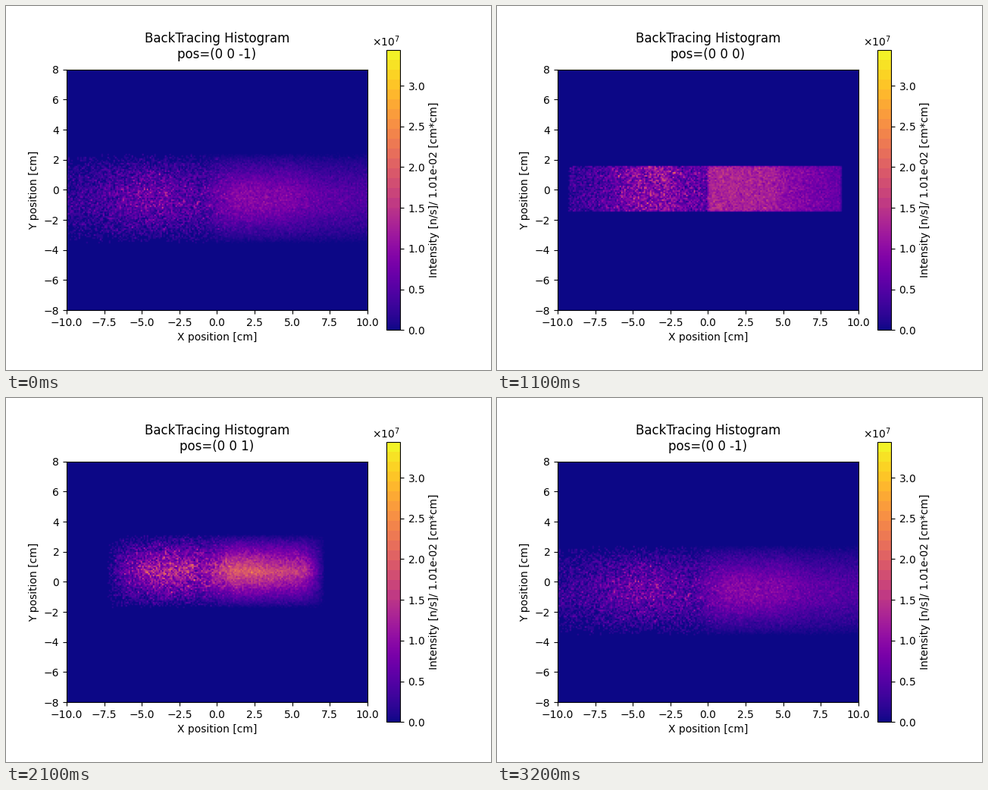
A matplotlib script for the animation above (3.4 s loop, 640 px wide and 480 px high).

```python
import numpy as np
import matplotlib.pyplot as plt
from matplotlib.animation import FuncAnimation
from matplotlib.colors import ListedColormap
from matplotlib.ticker import ScalarFormatter

FRAMES, INTERVAL = 34, 100
NX, NY = 199, 159
X_LIM, Y_LIM = (-10, 10), (-8, 8)
V_MAX = 3.442e7
Y_LOW, Y_HIGH = -1.45, 1.55
SPREAD = 1.2           # half width of the ray slopes
EXIT_Z, EXIT_X = 2, 5.4  # all rays pass |x| < EXIT_X at z = EXIT_Z

rng = np.random.default_rng(7)


def make_beam(xs, intensity, weight):
    """Sample rays at z=0 for a piecewise linear intensity profile along x."""
    grid = np.linspace(xs[0], xs[-1], 2000)
    density = np.interp(grid, xs, intensity)
    cdf = np.cumsum(density)
    cdf /= cdf[-1]
    bins = (xs[-1] - xs[0]) * NX / 20 * (Y_HIGH - Y_LOW) * NY / 16
    n = int(density.mean() * bins / weight)
    x = np.interp(rng.random(n), cdf, grid)
    y = rng.uniform(Y_LOW, Y_HIGH, n)
    # slopes converge towards the axis; the exit window cuts the outer ones
    low = np.maximum(-0.2 * x - SPREAD, (-EXIT_X - x) / EXIT_Z)
    high = np.minimum(-0.2 * x + SPREAD, (EXIT_X - x) / EXIT_Z)
    dx = rng.uniform(low, high)
    dy = 0.645 - 0.187 * y + rng.uniform(-SPREAD, SPREAD, n)
    return x, y, dx, dy, np.full(n, weight)


left = make_beam([-9.25, -7.5, -5.5, -3.8, -2.5, -1.5, 0],
                 [0.25e7, 0.36e7, 0.75e7, 1.05e7, 0.95e7, 0.65e7, 0.55e7],
                 0.17e7)
right = make_beam([0, 4, 5.5, 8.85],
                  [1.32e7, 1.26e7, 0.95e7, 0.65e7],
                  0.025e7)
x0, y0, dx, dy, weights = (np.concatenate(p) for p in zip(left, right))


def histogram(z):
    col = np.floor((x0 + z * dx - X_LIM[0]) / 20 * NX).astype(int)
    row = np.floor((y0 + z * dy - Y_LIM[0]) / 16 * NY).astype(int)
    ok = (col >= 0) & (col < NX) & (row >= 0) & (row < NY)
    flat = np.bincount(row[ok] * NX + col[ok], weights[ok], NX * NY)
    return flat.reshape(NY, NX)


def position(i):
    step = max(i, 1) if i < 32 else 1
    return (step - 11) / 10


def banded_plasma(start=112, step=9):
    """Plasma whose upper part is drawn in flat bands."""
    i = np.arange(256)
    band = start + (i - start) // step * step + step // 2
    return ListedColormap(plt.get_cmap("plasma")(np.where(i < start, i, band)))


fig, ax = plt.subplots(figsize=(6.4, 4.8), dpi=100)
image = ax.imshow(histogram(position(0)), origin="lower",
                  extent=(*X_LIM, *Y_LIM), cmap=banded_plasma(),
                  vmin=0, vmax=V_MAX)
ax.set_xlabel("X position [cm]")
ax.set_ylabel("Y position [cm]")
title = ax.set_title("BackTracing Histogram\npos=(0 0 -1)", pad=10.4)

bar = fig.colorbar(image, ax=ax, format=ScalarFormatter(useMathText=True))
bar.set_label("Intensity [n/s]/ 1.01e-02 [cm*cm]")
bar.ax.yaxis.set_offset_position("right")


def update(i):
    z = position(i)
    image.set_data(histogram(z))
    title.set_text(f"BackTracing Histogram\npos=(0 0 {z:g})")
    return image, title


anim = FuncAnimation(fig, update, frames=FRAMES, interval=INTERVAL,
                     repeat=True, repeat_delay=0, blit=False)
plt.show()
```
